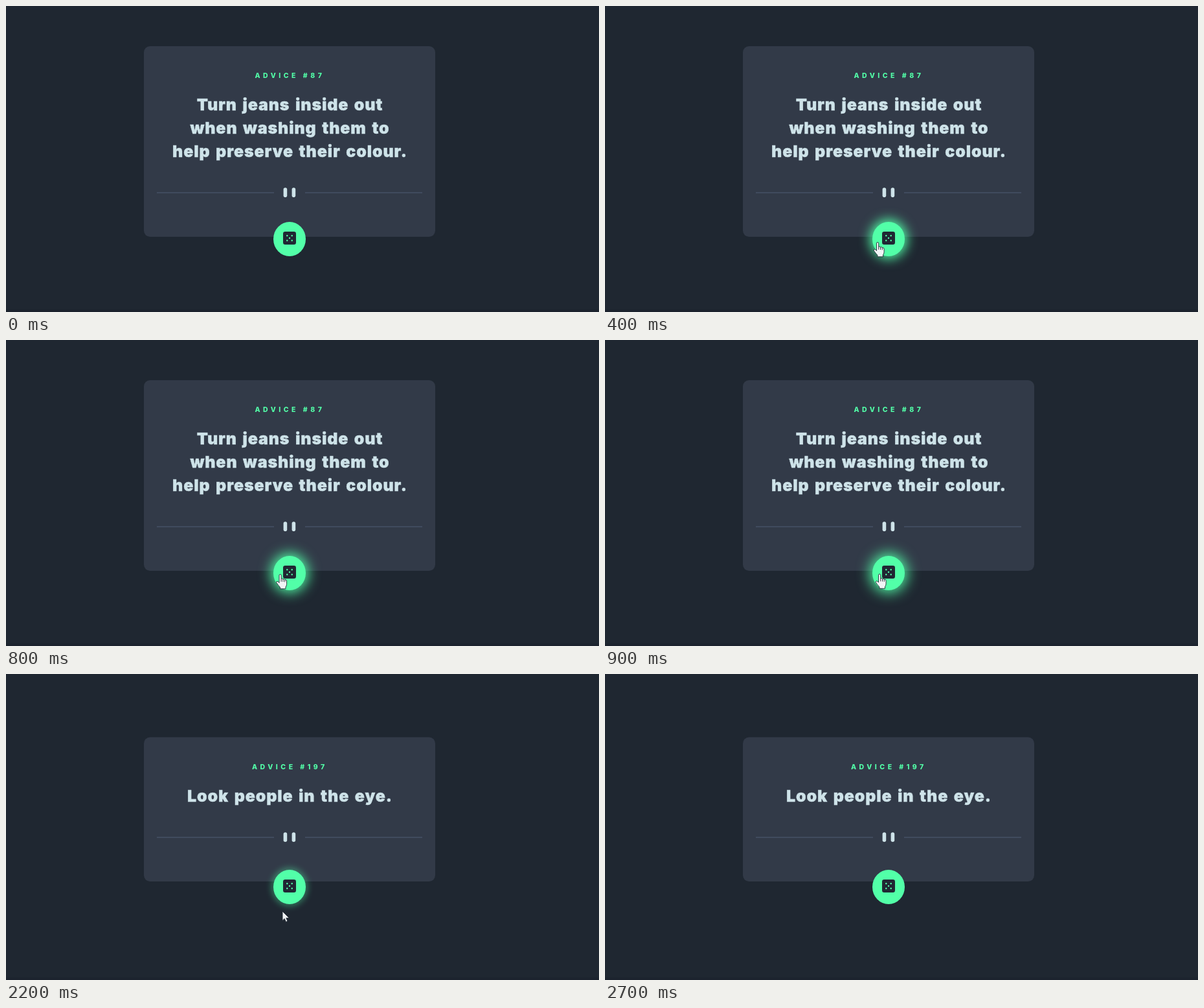
Write an HTML page that moves like this. It is 916 px wide and 472 px high and loops after 3.3 s.

```html
<!DOCTYPE html>
<html lang="en">
<head>
<meta charset="utf-8">
<title>Advice card</title>
<style>
  html, body { margin: 0; width: 100%; height: 100%; overflow: hidden; background: #1f2731; }
  svg { display: block; width: 100%; height: 100%; }
  text { font-family: Inter, "Liberation Sans", sans-serif; font-optical-sizing: none; text-anchor: middle; }
  .label { font-size: 10.5px; font-weight: 800; letter-spacing: 4.5px; fill: #52ffa8; }
  .quote { font-size: 25px; font-weight: 900; letter-spacing: .86px; word-spacing: 2.8px;
    fill: #cee3e9; stroke: #cee3e9; stroke-width: .4px; }
</style>
</head>
<body>
<svg viewBox="0 0 916 472">
  <defs>
    <filter id="blur" filterUnits="userSpaceOnUse" x="-90" y="-90" width="180" height="180" color-interpolation-filters="sRGB">
      <feGaussianBlur id="spread" stdDeviation="10"/>
    </filter>
  </defs>
  <rect width="916" height="472" fill="#1f2731"/>
  <rect y="468" width="916" height="4" fill="#1c232e"/>
  <rect id="card" x="213" width="450" rx="9.5" fill="#323a48"/>
  <text id="label" class="label" x="438.4"></text>
  <g id="quote"></g>
  <g id="divider">
    <path d="M233 7.4h181v.95h-181zM462 7.4h181v.95h-181z" fill="#4f5d74"/>
    <rect x="428.6" width="5.6" height="14.8" rx="2.8" fill="#cee3e9"/>
    <rect x="441.6" width="5.6" height="14.8" rx="2.8" fill="#cee3e9"/>
  </g>
  <g id="button">
    <ellipse id="glow" rx="28.5" ry="30" fill="#52ffa8" filter="url(#blur)"/>
    <ellipse id="ring" rx="26" ry="27.5" fill="#202c37"/>
    <ellipse rx="25" ry="26.5" fill="#52ffa8"/>
    <rect x="-10" y="-11.5" width="20" height="20" rx="3.3" fill="#202733"/>
    <g id="pips" fill="#52ffa8"></g>
  </g>
  <g stroke="#1f2632" stroke-width=".9" stroke-linejoin="round" fill="#f1f4f5">
    <g id="hand">
      <path d="M5 13.5V2.2Q5 .5 6.6 .5T8.2 2.2V7.4Q9.7 6.3 11 8Q12.6 7 13.7 8.7Q16.6 8.2 16.6 11V15.5Q16.6 18 15 20V22.8H6.4V20.4Q3.6 17.5 .8 13.4Q.2 11.6 2 11.2Q3.5 11.4 5 13.5Z"/>
      <path d="M8.2 7.4v4.4M11 8v4M13.7 8.7v3.6" fill="none"/>
    </g>
    <path id="arrow" d="M0 0V14.4L3.2 11.4L5.5 16.4L8 15.3L5.8 10.4H10.4Z"/>
  </g>
</svg>
<script>
const LOOP = 3300;
const $ = id => document.getElementById(id);
const NS = "http://www.w3.org/2000/svg";

const cards = [
  { from: 0, label: "ADVICE #87", top: 62, height: 294, button: 359.5,
    lines: ["Turn jeans inside out", "when washing them to", "help preserve their colour."] },
  { from: 2000, label: "ADVICE #197", top: 97.5, height: 222.5, button: 328.5,
    lines: ["Look people in the eye."] }
];

// time, cursor kind, cursor x, y, glow radius, glow opacity
const poses = [
  [0, "", 0, 0, 0, 0],
  [100, "arrow", 398, 415, 0, 0],
  [200, "hand", 410, 371, 7.5, 1],
  [300, "hand", 413, 367, 8.5, 1],
  [400, "hand", 414.5, 364, 9, 1],
  [500, "hand", 415.5, 362.5, 9.5, 1],
  [800, "hand", 417, 361, 10, 1],
  [900, "hand", 417.5, 360.5, 10.5, 1],
  [2000, "hand", 417.5, 361, 10, 1],
  [2100, "hand", 418, 361.5, 8, .7],
  [2200, "arrow", 427, 366, 5, .35],
  [2300, "arrow", 432, 369, 0, 0],
  [2500, "arrow", 442, 377, 0, 0],
  [2600, "arrow", 462, 432, 0, 0],
  [2700, "", 0, 0, 0, 0]
];

for (const [x, y] of [[-1, -1], [1, -1], [0, 0], [-1, 1], [1, 1]]) {
  const pip = document.createElementNS(NS, "circle");
  pip.setAttribute("cx", x * 3.75);
  pip.setAttribute("cy", y * 3.75 - 1.5);
  pip.setAttribute("r", 1.2);
  $("pips").append(pip);
}

const move = (id, x, y) => $(id).setAttribute("transform", `translate(${x} ${y})`);
const show = (id, on) => $(id).setAttribute("visibility", on ? "visible" : "hidden");

function showCard(card) {
  $("card").setAttribute("y", card.top);
  $("card").setAttribute("height", card.height);
  $("label").textContent = card.label;
  $("label").setAttribute("y", Math.round(card.top) + 49);
  const firstLine = Math.round(card.top) + 99;
  $("quote").replaceChildren(...card.lines.map((line, i) => {
    const text = document.createElementNS(NS, "text");
    text.setAttribute("class", "quote");
    text.setAttribute("x", 438.5);
    text.setAttribute("y", firstLine + 36 * i);
    text.textContent = line;
    return text;
  }));
  move("divider", 0, card.lines.length > 1 ? 280.2 : 244.2);
  move("button", 438, card.button);
}

let shownCard;
function draw(t) {
  const card = cards.findLast(c => c.from <= t);
  if (card !== shownCard) showCard(shownCard = card);

  const [, cursor, x, y, radius, opacity] = poses.findLast(p => p[0] <= t);
  for (const kind of ["hand", "arrow"]) {
    show(kind, cursor === kind);
    move(kind, x, y);
  }
  $("spread").setAttribute("stdDeviation", radius || 1);
  $("glow").setAttribute("opacity", opacity);
  show("ring", t >= 2300 && t < 2700);
}

const start = performance.now();
function tick() {
  draw((performance.now() - start) % LOOP);
  requestAnimationFrame(tick);
}
tick();
</script>
</body>
</html>
```
